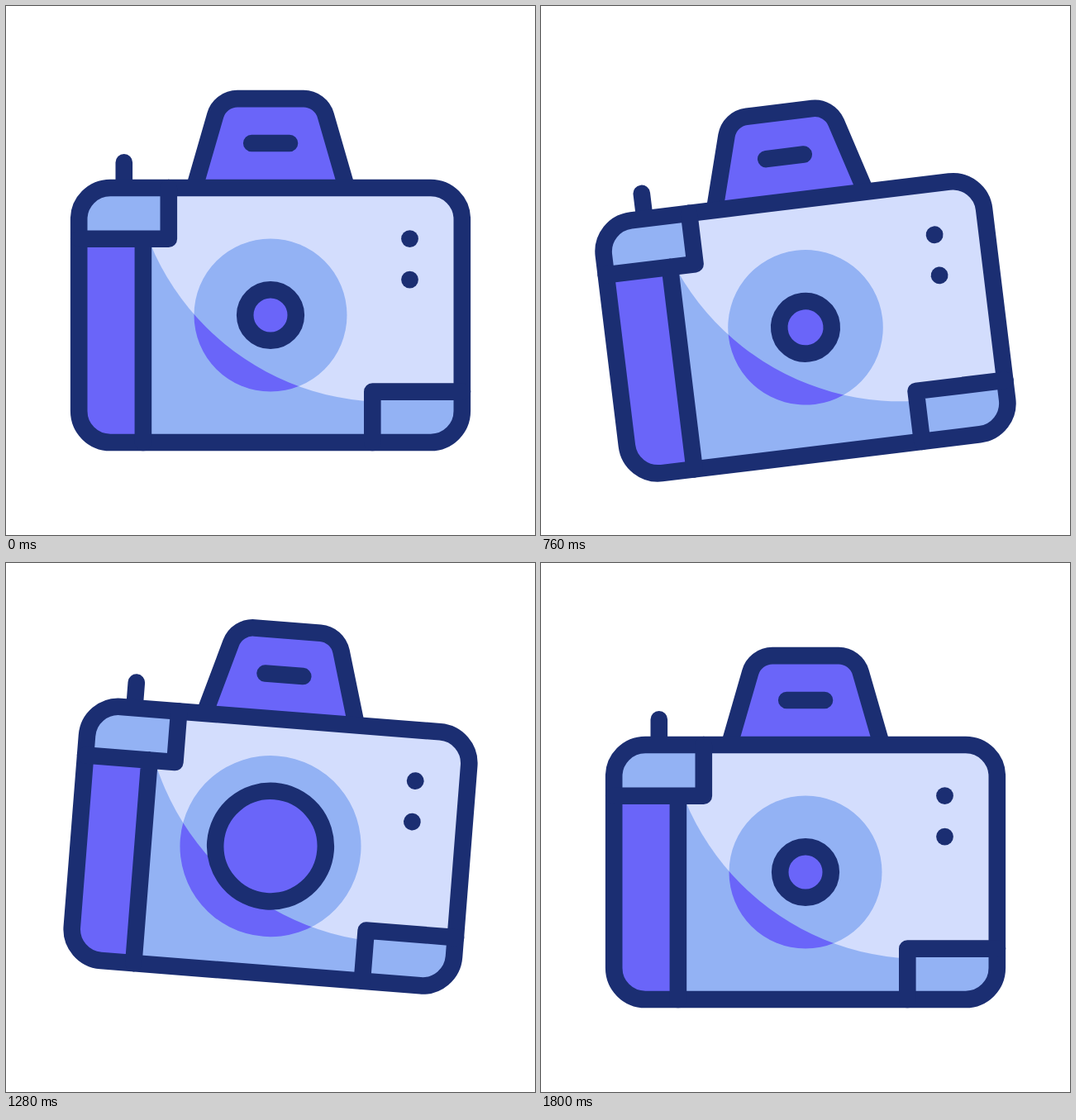
Recreate the animation shown at these times as an HTML page. Size 640 by 640 pixels, loop 1.92 s.

```html
<!DOCTYPE html>
<html lang="en">
<head>
<meta charset="utf-8">
<title>Camera</title>
<style>
  html, body { margin: 0; width: 100%; height: 100%; overflow: hidden; background: #fff; }
  svg { display: block; width: 100vw; height: 100vh; }
  .line { fill: none; stroke: #1b2e72; stroke-width: 20.6; stroke-linecap: round; stroke-linejoin: round; }
  .ink { fill: #1b2e72; }
  .violet { fill: #6a65f9; }
  .blue { fill: #93b2f4; }
  .pale { fill: #d3ddfd; }
</style>
</head>
<body>
<svg viewBox="0 0 640 640">
  <defs>
    <clipPath id="shell"><rect x="88.2" y="220" width="463.6" height="308" rx="38"/></clipPath>
    <clipPath id="shade">
      <path clip-rule="evenodd" d="M0 0H640V640H0Z M151 169a310 310 0 0 0 620 0a310 310 0 0 0 -620 0Z"/>
    </clipPath>
  </defs>
  <g id="camera">
    <path class="violet" d="M227.9 220L253.2 132.3A28 28 0 0 1 280 112.1H360A28 28 0 0 1 386.8 132.3L412.1 220Z"/>
    <path class="line" d="M227.9 220L253.2 132.3A28 28 0 0 1 280 112.1H360A28 28 0 0 1 386.8 132.3L412.1 220M297.2 166H343M142.8 189.3V220"/>
    <g clip-path="url(#shell)">
      <rect class="blue" x="88" y="220" width="464" height="308"/>
      <circle class="pale" cx="461" cy="169" r="310"/>
      <rect class="blue" x="88" y="220" width="109" height="62"/>
      <rect class="violet" x="88" y="282" width="78" height="246"/>
      <rect class="blue" x="443" y="467" width="109" height="61"/>
    </g>
    <circle class="blue glass" cx="320" cy="374"/>
    <g clip-path="url(#shade)"><circle class="violet glass" cx="320" cy="374"/></g>
    <circle class="line violet" id="iris" cx="320" cy="374" style="fill:#6a65f9"/>
    <rect class="line" x="88.2" y="220" width="463.6" height="308" rx="38"/>
    <path class="line" d="M88.2 281.8H196.8V220M165.9 281.8V528M443.3 528V466.6H552"/>
    <circle class="ink" cx="488.5" cy="281.6" r="10.4"/>
    <circle class="ink" cx="488.5" cy="331.1" r="10.4"/>
  </g>
</svg>
<script>
const LOOP = 1920, STEP = 40;
const SHARP = [0.6, 0.4], SOFT = [0.5, 0.42];

// Each key: [time in ms, value, easing towards it]
const tracks = {
  shift: [[120, 0], [665, 16.5, SHARP], [1216, -32, SHARP], [1780, 0, SOFT]],
  angle: [[160, 0], [720, -7, SHARP], [1262, 4.5, SHARP], [1780, 0, SOFT]],
  glass: [[680, 92.5], [1025, 111.4, SHARP], [1185, 111.4, SHARP], [1535, 92.5, SHARP]],
  iris: [[695, 30.8], [1135, 69.8, SHARP], [1165, 69.8, SHARP], [1635, 30.8, SHARP]]
};

// Bezier easing with flat ends: handles (a, 0) and (b, 1)
function ease(x, [a, b]) {
  let lo = 0, hi = 1;
  for (let i = 0; i < 24; i++) {
    const s = (lo + hi) / 2, q = 1 - s;
    if (3 * a * s * q * q + 3 * b * s * s * q + s * s * s < x) lo = s; else hi = s;
  }
  return lo * lo * (3 - 2 * lo);
}

function valueAt(keys, t) {
  if (t <= keys[0][0]) return keys[0][1];
  for (let i = 1; i < keys.length; i++) {
    const [t0, v0] = keys[i - 1], [t1, v1, curve] = keys[i];
    if (t < t1) return v0 + (v1 - v0) * ease((t - t0) / (t1 - t0), curve);
  }
  return keys[keys.length - 1][1];
}

const camera = document.getElementById("camera");
const iris = document.getElementById("iris");
const glass = document.querySelectorAll(".glass");

function draw(now) {
  const t = Math.floor((now % LOOP) / STEP) * STEP;
  const at = name => valueAt(tracks[name], t);
  camera.setAttribute("transform", `translate(0 ${at("shift")}) rotate(${at("angle")} 320 374)`);
  glass.forEach(c => c.setAttribute("r", at("glass")));
  iris.setAttribute("r", at("iris"));
}

const start = performance.now();
function tick() {
  draw(performance.now() - start);
  requestAnimationFrame(tick);
}
tick();
</script>
</body>
</html>
```
